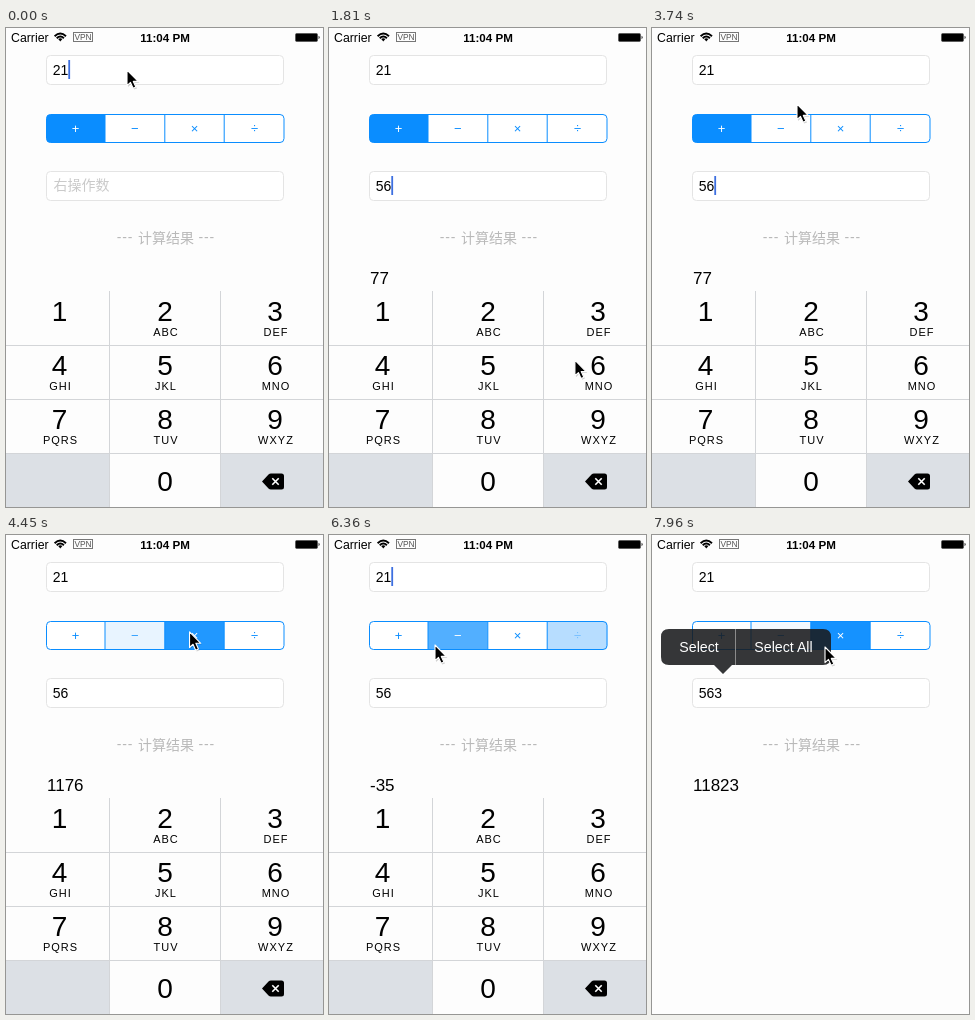
Write an HTML page that moves like this. It is 317 by 479 pixels and loops after 8 s.

```html
<!DOCTYPE html>
<html lang="zh">
<head>
<meta charset="utf-8">
<title>Calculator</title>
<style>
  html, body { margin: 0; width: 100%; height: 100%; overflow: hidden; background: #fdfdfd; }
  svg { display: block; width: 317px; height: 479px; font-family: "Liberation Sans", Arial, sans-serif; }
  .cjk { font-family: "Noto Sans CJK SC", "Noto Sans CJK", sans-serif; font-size: 14px; }
  .mid { text-anchor: middle; }
  .field { fill: #fff; stroke: #e4e4e4; }
</style>
</head>
<body>
<svg id="stage" viewBox="0 0 317 479" xmlns="http://www.w3.org/2000/svg">
  <rect width="317" height="479" fill="#fdfdfd"/>

  <text x="5" y="13.5" font-size="12.3">Carrier</text>
  <g fill="none" stroke="#000" stroke-width="1.9">
    <path d="M48.6 8.2Q54.3 2.6 60 8.2M50.7 10.3Q54.3 6.9 57.9 10.3"/>
    <path d="M52.2 11.1Q54.3 9.6 56.4 11.1L54.3 13.4Z" fill="#000" stroke="none"/>
  </g>
  <rect x="67.5" y="4.5" width="19" height="9" fill="none" stroke="#777"/>
  <text class="mid" x="77" y="12" font-size="8.4" fill="#555">VPN</text>
  <text class="mid" x="159" y="13.6" font-size="11.6" font-weight="bold">11:04 PM</text>
  <rect x="289.5" y="5.5" width="22" height="8" rx="1.2" fill="#000" stroke="#555" stroke-width=".8"/>
  <path d="M312.6 7.8Q314.6 9.5 312.6 11.2Z"/>

  <rect class="field" x="40.5" y="27.5" width="237" height="29" rx="4"/>
  <rect class="field" x="40.5" y="143.5" width="237" height="29" rx="4"/>
  <text x="46.7" y="47" font-size="14">21</text>
  <text id="hint" class="cjk" x="47.5" y="162.3" fill="#cacaca">右操作数</text>
  <text id="right" x="46.7" y="163" font-size="14"></text>
  <rect id="caret" width="1.8" height="19" fill="#3d6fe0"/>

  <clipPath id="pill"><rect x="40.5" y="86.5" width="238" height="28" rx="4"/></clipPath>
  <g id="segments" clip-path="url(#pill)"></g>
  <rect x="40.5" y="86.5" width="237.5" height="28" rx="4" fill="none" stroke="#0a8dff"/>
  <path d="M99 87V114M158.8 87V114M218.2 87V114" stroke="#0a8dff"/>

  <g fill="#b9b9b9">
    <text x="110.8" y="214" font-size="14" letter-spacing=".8">---</text>
    <text class="cjk" x="132" y="214.5">计算结果</text>
    <text x="192.5" y="214" font-size="14" letter-spacing=".8">---</text>
  </g>
  <text id="result" x="41" y="256" font-size="17"></text>

  <g id="keyboard">
    <rect y="263" width="317" height="216" fill="#fdfdfd"/>
    <rect y="426" width="103" height="53" fill="#dce0e5"/>
    <rect x="215" y="426" width="102" height="53" fill="#dce0e5"/>
    <rect id="press" width="110" height="53" fill="#dce0e5"/>
    <path d="M0 317.5H317M0 371.5H317M0 425.5H317M103.5 263V479M214.5 263V479" stroke="#d3d5d8"/>
    <g id="keys" class="mid"></g>
    <path d="M256 453.5L262.5 446.6Q263.5 445.5 265 445.5H275.5Q278 445.5 278 448V459Q278 461.5 275.5 461.5H265Q263.5 461.5 262.5 460.4Z"/>
    <path d="M266.3 450.3L272.7 456.7M272.7 450.3L266.3 456.7" stroke="#fff" stroke-width="1.6"/>
  </g>

  <g id="menu">
    <path d="M17 94H171Q179 94 179 102V122Q179 130 171 130H80L71 139L62 130H17Q9 130 9 122V102Q9 94 17 94Z" fill="#1a1b1d" fill-opacity=".88"/>
    <path d="M83.5 94V130" stroke="#8b8b8b"/>
    <g class="mid" fill="#fff" font-size="14.2">
      <text x="47" y="117.3">Select</text>
      <text x="131.5" y="117.3">Select All</text>
    </g>
  </g>

  <circle id="ring" r="10" fill="none" stroke="#222" stroke-width="1"/>
  <g id="cursor">
    <path d="M1 2V17L4.6 13.7L7.2 19.6L10 18.4L7.4 12.7H12.4Z" fill="#000" opacity=".18"/>
    <path d="M0 0V15.6L3.5 12.4L6.1 18.3L8.9 17.1L6.3 11.4H11.2Z" stroke="#fff" stroke-width="1.1" stroke-linejoin="round"/>
  </g>
</svg>
<script>
const LOOP = 8000;
const BLUE = [10, 141, 255];
const $ = id => document.getElementById(id);
const clamp = v => Math.max(0, Math.min(1, v));
const ease = v => v * v * (3 - 2 * v);
const latest = (list, t) => list.filter(item => item[0] <= t).pop();

// Cursor path: time, x, y
const path = [
  [140, 121, 42], [640, 130, 161], [860, 130, 161], [940, 160, 318],
  [1110, 175, 334], [1350, 175, 334], [1590, 268, 335], [1740, 268, 335],
  [2040, 112, 315], [2660, 109, 207], [2870, 109, 207], [3630, 143, 118],
  [3740, 145, 76], [3930, 130, 99], [4060, 130, 99], [4230, 186, 99],
  [4400, 186, 99], [4840, 120, 42], [5020, 120, 42], [5260, 198, 77],
  [5480, 246, 99], [5680, 246, 99], [6130, 118, 101], [6260, 115, 102],
  [6360, 106, 110], [6760, 102, 161], [7260, 102, 161], [7700, 187, 100],
  [7840, 187, 100], [7960, 173, 112]
];
// Clicks: start, end, x, y
const clicks = [
  [740, 980, 130.5, 161.5], [1110, 1360, 176.5, 334.5], [1600, 1740, 269.5, 335.5],
  [3930, 4050, 131, 99.5], [4230, 4350, 187, 99.5], [4850, 4990, 121, 42.5],
  [5490, 5620, 247, 99.5], [6150, 6270, 118, 101.5], [7020, 7200, 103.5, 161.5],
  [7710, 7830, 188, 100.5]
];
const choices = [[-500, 0], [3980, 1], [4270, 2], [5540, 3], [6220, 1], [7770, 2]];
const entries = [[0, ""], [1360, "5"], [1680, "56"], [7260, "563"]];
const focuses = [[0, 0], [850, 1], [4950, 0], [6940, 1]];
const blinks = [[0], [850], [1360], [1680], [4950], [6940], [7260]];
const presses = [[1200, 1360, 104, 318], [1600, 1720, 215, 318]];
const operations = [(a, b) => a + b, (a, b) => a - b, (a, b) => a * b, (a, b) => a / b];

const edges = [40, 99, 158.8, 218.2, 279];
$("segments").innerHTML = [..."+−×÷"].map((sign, i) => {
  const x = edges[i], width = edges[i + 1] - x;
  return `<rect x="${x}" y="86" width="${width}" height="29"/>` +
    `<text class="mid" x="${x + width / 2}" y="105.3" font-size="13">${sign}</text>`;
}).join("");
const fills = document.querySelectorAll("#segments rect");
const signs = document.querySelectorAll("#segments text");

const letters = ["", "ABC", "DEF", "GHI", "JKL", "MNO", "PQRS", "TUV", "WXYZ"];
const columns = [53.5, 159, 269];
$("keys").innerHTML = letters.map((label, i) => {
  const x = columns[i % 3], y = 293 + 54 * Math.floor(i / 3);
  return `<text x="${x}" y="${y}" font-size="28">${i + 1}</text>` +
    `<text x="${x + 1}" y="${y + 15}" font-size="11" letter-spacing="1">${label}</text>`;
}).join("") + `<text x="159" y="463" font-size="28">0</text>`;

function place(node, x, y) {
  node.setAttribute("transform", `translate(${x} ${y})`);
}

function show(node, visible) {
  node.setAttribute("visibility", visible ? "visible" : "hidden");
}

function cursorAt(t) {
  const next = path.findIndex(p => p[0] > t);
  if (next < 1) return (next ? path[path.length - 1] : path[0]).slice(1);
  const [t0, x0, y0] = path[next - 1], [t1, x1, y1] = path[next];
  const k = ease((t - t0) / (t1 - t0));
  return [x0 + (x1 - x0) * k, y0 + (y1 - y0) * k];
}

function drawSegments(t) {
  const [start, chosen] = latest(choices, t);
  const before = latest(choices, start - 1);
  const k = clamp((t - start) / 200);
  fills.forEach((rect, i) => {
    const amount = i === chosen ? k : before && i === before[1] ? 1 - k : 0;
    const mix = (from, to, v) => `rgb(${from.map((c, j) => Math.round(c + (to[j] - c) * v))})`;
    rect.setAttribute("fill", mix([255, 255, 255], BLUE, amount));
    signs[i].setAttribute("fill", mix(BLUE, [255, 255, 255], clamp(amount * 1.5)));
  });
  return chosen;
}

function draw(t) {
  const chosen = drawSegments(t);
  const text = latest(entries, t)[1];
  show($("hint"), !text);
  $("right").textContent = text;
  $("result").textContent = text ? operations[chosen](21, Number(text)) : "";

  const field = latest(focuses, t)[1];
  const length = field ? text.length : 2;
  place($("caret"), 47 + length * 7.65, field ? 148 : 32);
  show($("caret"), (t - latest(blinks, t)[0]) % 1000 < 560);

  const press = presses.find(p => t >= p[0] && t < p[1]);
  show($("press"), press);
  if (press) place($("press"), press[2], press[3]);

  place($("keyboard"), 0, 220 * ease(clamp((t - 7300) / 260)));
  $("menu").setAttribute("opacity", clamp((t - 7500) / 120));

  const click = clicks.find(c => t >= c[0] && t < c[1]);
  show($("ring"), click);
  if (click) place($("ring"), click[2], click[3]);
  place($("cursor"), ...cursorAt(t));
}

const begin = performance.now();
function tick() {
  draw((performance.now() - begin) % LOOP);
  requestAnimationFrame(tick);
}
tick();
</script>
</body>
</html>
```
